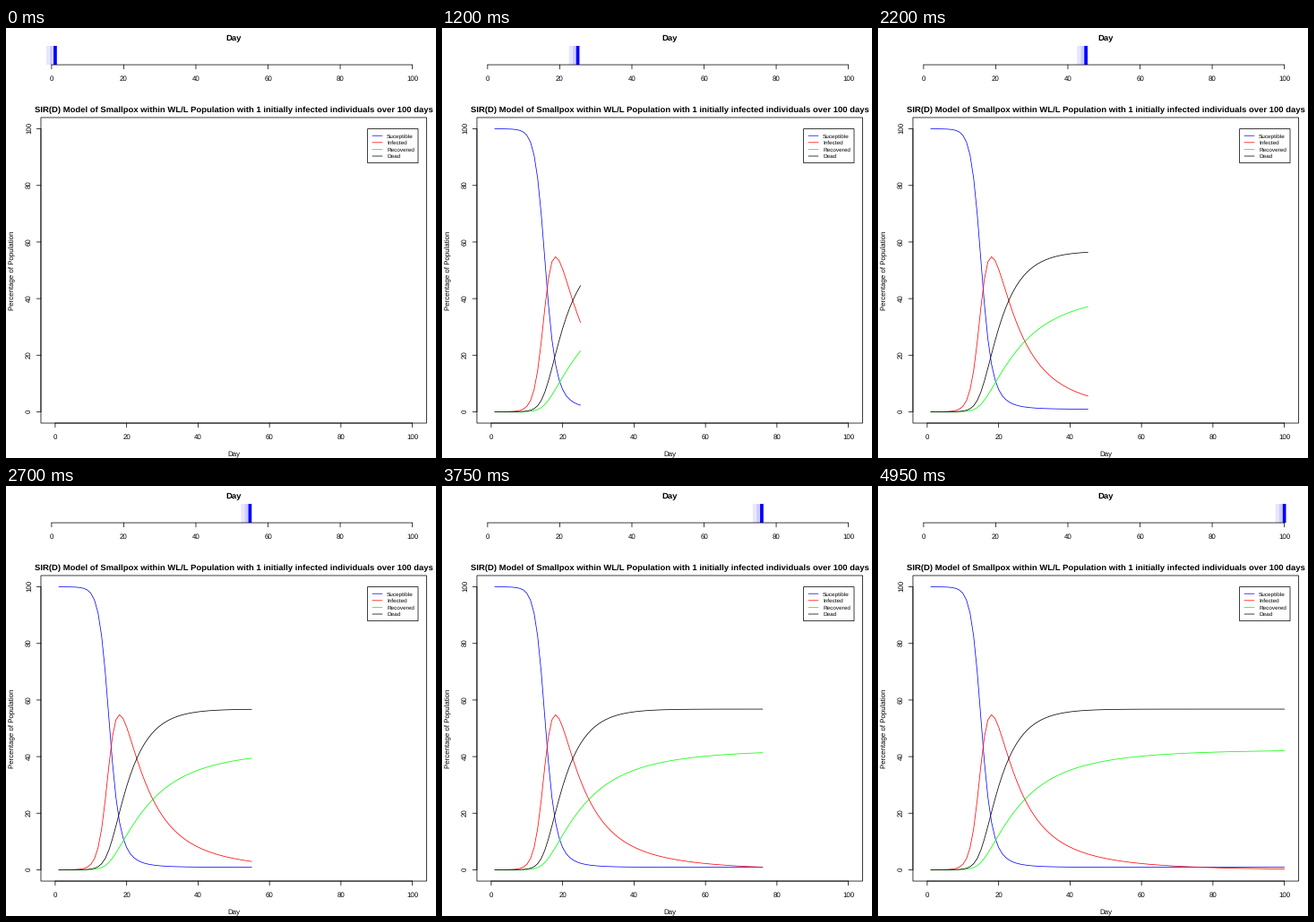
Recreate the animation shown at these times as a matplotlib script. Size 480 px wide and 480 px high, loop 5 s.

```python
import numpy as np
import matplotlib.pyplot as plt
from matplotlib.animation import FuncAnimation
from matplotlib.patches import Rectangle

SIZE, DPI, DAYS = 480, 100, 100
PX = 72 / DPI                      # points per pixel
STROKE = 0.75 * PX
SMALL, LABEL, TITLE = 6.34, 7.92, 9.5
LEFT, RIGHT, TOP, BOTTOM = 38.97, 469.55, 99.96, 441.03
BAR_TOP, BAR_AXIS = 19.96, 41.03
COLORS = ["#0000ff", "#ff0000", "#00ff00", "#000000"]
NAMES = ["Suceptible", "Infected", "Recovered", "Dead"]

plt.rcParams["font.family"] = "Liberation Sans"
plt.rcParams["text.hinting"] = "none"
plt.rcParams["lines.solid_capstyle"] = "round"


def plot_x(day):
    return 54.92 + 3.987 * day


def plot_y(percent):
    return 428.4 - 3.158 * percent


def bar_x(day):
    return 50.89 + 4.027 * day


def epidemic():
    """Daily percentages: susceptible, infected, recovered, dead."""
    death, cure, settle = 0.102, 0.0345, 0.0415
    dt, span = 0.005, 125
    s, acute, late, r, d = 100.0, 1e-4, 0.0, 0.0, 0.0
    rows = []
    for _ in range(int(span / dt)):
        rows.append((s, acute + late, r, d))
        caught = 0.0092 * (s / 100) ** 0.035 * s * acute
        healed = (0.05 + 0.0022 * late) * late
        s -= caught * dt
        r += (cure * acute + healed) * dt
        d += death * acute * dt
        late += (settle * acute - healed) * dt
        acute += (caught - (death + cure + settle) * acute) * dt
    rows = np.array(rows).T
    t = np.arange(rows.shape[1]) * dt
    # Line the outbreak up so that 38.3 % are susceptible on day 16.
    t += 16 - np.interp(-38.3, -rows[0], t)
    return [np.interp(np.arange(1, DAYS + 1), t, row) for row in rows]


fig = plt.figure(figsize=(SIZE / DPI, SIZE / DPI), dpi=DPI, facecolor="white")
ax = fig.add_axes([0, 0, 1, 1])
ax.set_xlim(0, SIZE)
ax.set_ylim(SIZE, 0)
ax.axis("off")


def line(xs, ys, color="black", **kw):
    return ax.plot(xs, ys, color=color, lw=STROKE, snap=False, **kw)[0]


def text(x, y, s, size=LABEL, ha="center", **kw):
    ax.text(x, y, s, fontsize=size * PX, ha=ha, va="baseline",
            rotation_mode="anchor", **kw)


def frame_box(x0, y0, x1, y1, **kw):
    ax.add_patch(Rectangle((x0, y0), x1 - x0, y1 - y0, fc="white", ec="black",
                           lw=STROKE, snap=False, **kw))


def x_axis(to_x, y, label_y):
    line([to_x(0), to_x(100)], [y, y])
    for v in range(0, 101, 20):
        line([to_x(v)] * 2, [y, y + 4.75])
        text(to_x(v), label_y, str(v))


# Day slider
text(254.3, 14, "Day", TITLE, weight="bold")
bars = []
for lag, alpha in ((2, 25 / 255), (1, 50 / 255), (0, 1)):
    bar = Rectangle((0, BAR_TOP), 3.75, BAR_AXIS - BAR_TOP, fc="#0000ff",
                    ec="none", alpha=alpha, snap=False)
    ax.add_patch(bar)
    bars.append((bar, lag))
x_axis(bar_x, BAR_AXIS, 59)

# Main chart
text(254.3, 94, "SIR(D) Model of Smallpox within WL/L Population with "
     "1 initially infected individuals over 100 days", TITLE, weight="bold")
frame_box(LEFT, TOP, RIGHT, BOTTOM, zorder=0)
x_axis(plot_x, BOTTOM, 459)
text(254.3, 478, "Day")
line([LEFT, LEFT], [plot_y(0), plot_y(100)])
for v in range(0, 101, 20):
    line([LEFT - 4.75, LEFT], [plot_y(v)] * 2)
    text(28, plot_y(v) - 0.7, str(v), rotation=90)
text(9, 270.5, "Percentage of Population", rotation=90)

curves = [line([], [], c) for c in COLORS]

# Legend
frame_box(403.6, 112.6, 460, 150.6, zorder=3)
for i, name in enumerate(NAMES):
    y = 120.2 + 7.6 * i
    line([409, 420], [y, y], COLORS[i], zorder=4)
    text(425, y + 2.4, name, SMALL, ha="left", zorder=4)

series = epidemic()
day_x = plot_x(np.arange(1, DAYS + 1))


def draw(frame):
    day = frame + 1
    for bar, lag in bars:
        bar.set_x(bar_x(day - lag) - 1.875)
    shown = day if day > 1 else 0
    for curve, values in zip(curves, series):
        curve.set_data(day_x[:shown], plot_y(values[:shown]))
    return [bar for bar, _ in bars] + curves


anim = FuncAnimation(fig, draw, frames=DAYS, interval=50, repeat=True,
                     repeat_delay=0, blit=False)
plt.show()
```
